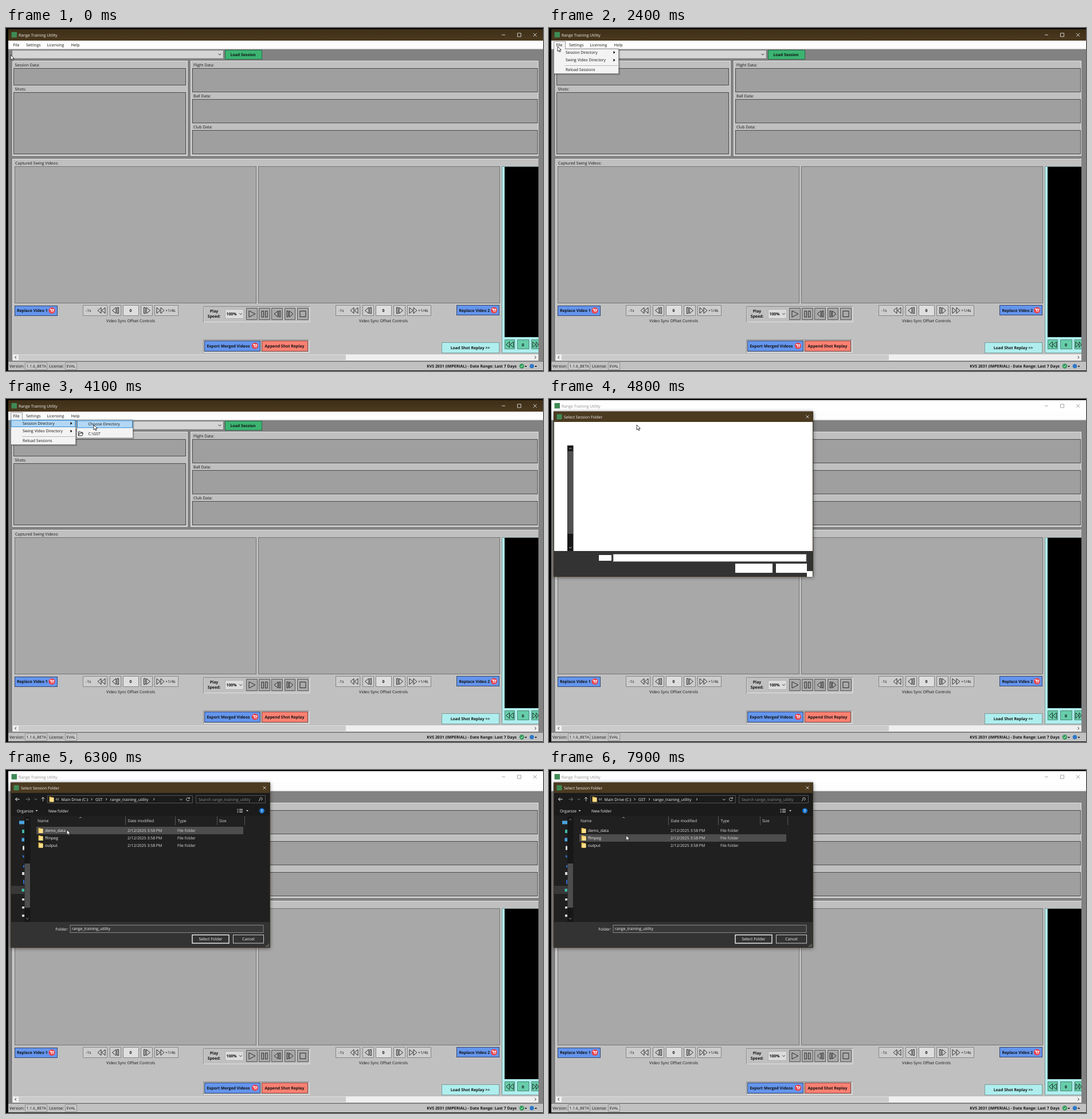
An HTML page for the animation above (8 s loop, 937x598 px).

```html
<!DOCTYPE html>
<html lang="en">
<head>
<meta charset="utf-8">
<title>Range Training Utility</title>
<style>
html, body { margin: 0; width: 100%; height: 100%; overflow: hidden; background: #000; }
svg { display: block; width: 937px; height: 598px; }
text { font: 6.9px "Open Sans", "Noto Sans", sans-serif; fill: #111; text-rendering: geometricPrecision; }
.b text, text.b { font-weight: 700; }
.mid { text-anchor: middle; }
.end { text-anchor: end; }
.light text, text.white { fill: #f4f4f4; }
text.dim { fill: #8c8c8c; }
text.col { fill: #dedede; }
.panel { fill: #c0c0c0; stroke: #e2e2e2; }
.box { fill: #9f9f9f; stroke: #4c4c4c; }
.video { fill: #a8a8a8; stroke: #747474; }
.btn { fill: #cdcdcd; stroke: #858585; }
.key { fill: #a9a9a9; stroke: #555; }
.blue { fill: #6495ed; stroke: #34466b; }
.cyan { fill: #afeeee; stroke: #7d9c9c; }
.teal { fill: #66cdaa; stroke: #4d8875; }
.ico { fill: none; stroke: #1c1c1c; stroke-width: .9; }
.line { fill: none; stroke: #ddd; stroke-width: .9; }
.pick { fill: #b3d7f3; stroke: #0078d7; stroke-width: .8; }
.hover { fill: #4d4d4d; }
.shade { filter: drop-shadow(0 1.5px 3px rgba(0, 0, 0, .5)); }

/* Timed states */
.s { opacity: 0; animation: 8s step-end infinite; }
.menu { animation-name: menu; }
.item { animation-name: item; }
.sub { animation-name: sub; }
.choose { animation-name: choose; }
.idle { animation-name: idle; }
.blank { animation-name: blank; }
.dialog { animation-name: dialog; }
.head { animation-name: head; }
.root { animation-name: root; }
.named { animation-name: named; }
.rowA { animation-name: rowA; }
.inner { animation-name: inner; }
.rowB { animation-name: rowB; }
.rowC { animation-name: rowC; }
@keyframes menu { 25% { opacity: 1 } 55%, 100% { opacity: 0 } }
@keyframes item { 36.25% { opacity: 1 } 55%, 100% { opacity: 0 } }
@keyframes sub { 41.25% { opacity: 1 } 55%, 100% { opacity: 0 } }
@keyframes choose { 47.5% { opacity: 1 } 55%, 100% { opacity: 0 } }
@keyframes idle { 55%, 100% { opacity: 1 } }
@keyframes blank { 57.5% { opacity: 1 } 61.25%, 100% { opacity: 0 } }
@keyframes dialog { 61.25%, 100% { opacity: 1 } }
@keyframes head { 67.5% { opacity: 1 } 70%, 100% { opacity: 0 } }
@keyframes root { 61.25% { opacity: 1 } 77.5%, 100% { opacity: 0 } }
@keyframes rowA { 70% { opacity: 1 } 77.5%, 100% { opacity: 0 } }
@keyframes named { 75%, 100% { opacity: 1 } }
@keyframes inner { 77.5%, 100% { opacity: 1 } }
@keyframes rowB { 77.5% { opacity: 1 } 93.75%, 100% { opacity: 0 } }
@keyframes rowC { 93.75%, 100% { opacity: 1 } }

#cursor { animation: roam 8s ease-in-out infinite; }
@keyframes roam {
  0%, 12.5% { transform: translate(8px, 47px); }
  23.75%, 31.25% { transform: translate(15px, 32px); }
  35% { transform: translate(20px, 35px); }
  38.75%, 43.75% { transform: translate(82px, 43px); }
  51.25%, 61.25% { transform: translate(153px, 45px); }
  68.75% { transform: translate(126px, 91px); }
  72.5%, 77.5% { transform: translate(104px, 104px); }
  88.75%, 91.25% { transform: translate(185.5px, 111px); }
  98.75%, 100% { transform: translate(134.5px, 114px); }
}
</style>
</head>
<body>
<svg viewBox="0 0 937 598">
<defs>
  <linearGradient id="bar" x2="0" y2="1"><stop stop-color="#3f2f18"/><stop offset="1" stop-color="#4b3a20"/></linearGradient>
  <path id="twin" d="M-1-5L-7 0L-1 5ZM6-5L0 0L6 5Z"/>
  <path id="step" d="M1-5.2L-5.5 0L1 5.2ZM3-5.2h2.5v10.4h-2.5Z"/>
  <path id="down" d="M-2.3-1.2L0 1.2L2.3-1.2"/>
  <path id="next" d="M-1-2L1 0L-1 2"/>
  <path id="drop" d="M-2-1h4l-2 2.2Z"/>
  <path id="winctl" d="M865 12h6M892.5 9h6v6h-6ZM920 9l6 6m0-6l-6 6"/>
  <g id="cart"><circle r="5.6" fill="#e8434c"/><path d="M-3.2-2.4h1.4l.9 3.4h3.4l.8-2.6h-4.8M-.6 2.6h.1M2 2.6h.1" fill="none" stroke="#fff" stroke-width="1.1" stroke-linecap="round"/></g>
  <g id="folder"><path d="M0 .5h3l1 1h3.6v8h-7.6Z" fill="#e9b949"/><path d="M1.3 2.5h6.8v7h-6.8Z" fill="#ffe08a"/></g>
  <g id="sync">
    <path class="btn" d="M134.5 483.5h42v18h-42ZM181.5 483.5h19v18h-19ZM235.5 483.5h20v18h-20ZM259.5 483.5h41v18h-41Z"/>
    <path d="M204.5 483.5h27v18h-27Z" fill="#dedede" stroke="#858585"/>
    <g class="ico">
      <use href="#twin" x="167" y="492.500"/><use href="#step" x="191" y="492.500"/>
      <use href="#step" transform="translate(246 492.500) scale(-1 1)"/>
      <use href="#twin" transform="translate(269 492.500) scale(-1 1)"/>
    </g>
    <text x="139" y="495">-1s</text><text x="278" y="495">+1/4s</text>
    <text class="b mid" x="217.500" y="495">0</text>
    <text class="mid" x="217.500" y="512.500">Video Sync Offset Controls</text>
  </g>
  <g id="frame">
    <rect class="shade" x="8.500" y="22" width="452" height="287.500" fill="#333" stroke="#3b3122"/>
    <rect x="9" y="22" width="451" height="18" fill="#4b3a20"/>
    <rect x="13.500" y="26.500" width="9" height="9" fill="#3f8a55"/>
    <text class="white" x="26" y="33.500">Select Session Folder</text>
    <path class="line" d="M448.500 28.500l5 5m0-5l-5 5"/>
  </g>
  <g id="kind"><text class="col" x="212">2/12/2025 3:58 PM</text><text class="col" x="299">File folder</text><use href="#folder" x="56.500" y="-7.500"/></g>
</defs>

<!-- Main window -->
<rect x="4" y="2" width="933" height="595" fill="#828282"/>
<rect x="4" y="2" width="933" height="20" fill="url(#bar)"/>
<text class="white" x="22" y="14.500">Range Training Utility</text>
<use href="#winctl" class="line"/>
<g class="s idle">
  <rect x="4" y="2" width="933" height="20" fill="#fff"/>
  <text class="dim" x="22" y="14.500">Range Training Utility</text>
  <use href="#winctl" fill="none" stroke="#999" stroke-width=".9"/>
</g>
<rect x="9.500" y="7" width="9.500" height="9.500" fill="#3f8a55"/>
<rect x="4" y="22" width="933" height="15" fill="#fdfdfd"/>
<rect x="4" y="35.500" width="933" height="1.500" fill="#e4e4e4"/>
<rect class="s menu" x="8.500" y="23.500" width="20" height="13" fill="#f4f4f4" stroke="#999"/>
<text x="12.500" y="31.500">File</text><text x="35" y="31.500">Settings</text>
<text x="71.500" y="31.500">Licensing</text><text x="113.500" y="31.500">Help</text>

<rect x="11.500" y="39.500" width="367" height="13" fill="#d5d5d5" stroke="#c2c2c2"/>
<use href="#down" class="ico" x="373" y="46"/>
<rect x="382.500" y="38.500" width="64" height="16" fill="#3cb371" stroke="#2a6b47"/>
<text class="b mid" x="413.500" y="48.800">Load Session</text>

<g class="panel">
  <rect x="11.500" y="57.500" width="305" height="165"/>
  <rect x="322.500" y="57.500" width="606" height="165"/>
  <path d="M929 228.500H11.500V579.500H929"/>
</g>
<g class="box">
  <rect x="13.500" y="70.500" width="300" height="29"/><rect x="13.500" y="112.500" width="300" height="107"/>
  <rect x="325.500" y="70.500" width="602" height="41"/><rect x="325.500" y="124.500" width="602" height="41"/>
  <rect x="325.500" y="178.500" width="602" height="41"/>
</g>
<text x="15.500" y="67">Session Data:</text><text x="15.500" y="109">Shots:</text>
<text x="327" y="67">Flight Data:</text><text x="327" y="121">Ball Data:</text><text x="327" y="175">Club Data:</text>
<text x="16" y="238">Captured Swing Videos:</text>
<rect class="video" x="15.500" y="241.500" width="421" height="238"/>
<rect class="video" x="440.500" y="241.500" width="421" height="238"/>

<path class="cyan" d="M929 241.500H865.500V566.500H929"/>
<rect x="870" y="242" width="59" height="297" fill="#000"/>
<path class="teal" d="M870.500 543.500h17v16h-17ZM892.500 543.500h20v16h-20ZM929 543.500h-12v16h12"/>
<g class="ico">
  <use href="#twin" x="879.500" y="552"/>
  <path d="M919 547l5 5l-5 5ZM929 552l-4-5v10l4-5"/>
</g>
<text class="b mid" x="902" y="554.500">0</text>

<use href="#sync"/><use href="#sync" x="441"/>

<g class="b">
  <rect class="blue" x="15.500" y="484.500" width="74" height="17"/>
  <text x="19" y="495">Replace Video 1</text><use href="#cart" x="80" y="492.500"/>
  <rect class="blue" x="786.500" y="483.500" width="74" height="17"/>
  <text x="790.500" y="494.500">Replace Video 2</text><use href="#cart" x="851.500" y="492"/>

  <rect class="panel" x="345" y="485.500" width="185" height="27"/>
  <path d="M344.500 513V485.500H530" fill="none" stroke="#8a8a8a"/>
  <text class="mid" x="363" y="496">Play</text><text class="mid" x="363" y="505">Speed:</text>
  <rect x="382.500" y="490.500" width="32" height="16" fill="#dcdcdc" stroke="#b0b0b0"/>
  <text x="384.500" y="501">100%</text><use href="#down" class="ico" x="409.500" y="498.500"/>
  <path class="key" d="M419.500 488.500h19v20h-19ZM441.500 488.500h19v20h-19ZM463.500 488.500h19v20h-19ZM486.500 488.500h18v20h-18ZM508.500 488.500h19v20h-19Z"/>
  <g class="ico">
    <path d="M424 493L435 498.500L424 504ZM446 493.500h3.500v10.500h-3.500ZM452.500 493.500h3.500v10.500h-3.500ZM513 493.500h10v10h-10Z"/>
    <use href="#step" x="473.500" y="498.500"/>
    <use href="#step" transform="translate(495.500 498.500) scale(-1 1)"/>
  </g>

  <rect class="panel" x="345" y="543.500" width="184" height="22"/>
  <path d="M344.500 566V543.500H529" fill="none" stroke="#8a8a8a"/>
  <rect class="blue" x="346.500" y="545.500" width="97" height="18"/>
  <text x="350.500" y="557">Export Merged Videos</text><use href="#cart" x="434.500" y="554"/>
  <rect x="446.500" y="545.500" width="80" height="18" fill="#fa8072" stroke="#7d4740"/>
  <text class="mid" x="486" y="557">Append Shot Replay</text>
  <rect class="cyan" x="760.500" y="548.500" width="100" height="18"/>
  <text class="mid" x="810" y="560">Load Shot Replay &gt;&gt;</text>
</g>

<rect x="12" y="569" width="917" height="10.500" fill="#efefef"/>
<rect x="22" y="569.500" width="571" height="9.500" fill="#cbcbcb"/>
<path class="ico" d="M18 572l-2.500 2.200l2.500 2.200M922.500 572l2.500 2.200l-2.500 2.200"/>

<rect x="4" y="582" width="933" height="15" fill="#c1c1c1"/>
<path d="M33.500 583.500h38v12h-38ZM103.500 583.500h20v12h-20Z" fill="#cbcbcb" stroke="#8e8e8e"/>
<text x="6" y="592">Version:</text><text x="35.500" y="592">1.1.6_BETA</text>
<text x="75" y="592">License:</text><text x="105.500" y="592">EVAL</text>
<text class="b end" x="891" y="592">KVS 2031 (IMPERIAL) - Date Range: Last 7 Days</text>
<circle cx="900" cy="589.500" r="4.200" fill="#2e9b57"/>
<path d="M898 589.500l1.500 1.600l2.800-3" fill="none" stroke="#fff"/>
<circle cx="917.500" cy="589.500" r="3.800" fill="#2f78c8"/>
<use href="#drop" x="907" y="590"/><use href="#drop" x="924.500" y="590"/>

<!-- File menu -->
<g class="s menu">
  <rect x="9" y="37" width="115" height="45" fill="#000" opacity=".2"/>
  <rect x="8.500" y="36.500" width="113" height="43" fill="#f3f3f3" stroke="#888"/>
  <path d="M9 36.500h19" stroke="#f4f4f4"/>
  <rect class="s item pick" x="9" y="37" width="112" height="11.500"/>
  <path d="M28 65.500h92" stroke="#b5b5b5"/>
  <text x="29" y="44.800">Session Directory</text><text x="29" y="58.300">Swing Video Directory</text><text x="29" y="75">Reload Sessions</text>
  <path d="M112.500 40l3 2.500l-3 2.500ZM112.500 53.500l3 2.500l-3 2.500Z"/>
</g>
<g class="s sub">
  <rect x="124" y="38" width="99.500" height="32" fill="#000" opacity=".2"/>
  <rect x="123.500" y="36.500" width="98" height="31.500" fill="#f3f3f3" stroke="#888"/>
  <rect class="s choose pick" x="124.500" y="38" width="96" height="12"/>
  <text x="143.500" y="46.300">Choose Directory</text><text x="143.500" y="63">C:\GST</text>
  <path class="ico" d="M126.500 64v-7h3l1 1h3v1.500M126.500 64l1.700-4.500h6.300L133 64Z"/>
</g>

<!-- Folder picker while loading -->
<g class="s blank">
  <use href="#frame"/>
  <rect x="9" y="40" width="451" height="225" fill="#fff"/>
  <rect x="32" y="81" width="10.500" height="184" fill="#171717"/>
  <rect x="32.500" y="91" width="9.500" height="144" fill="#505050"/>
  <path class="line" d="M35 87.500l2.200-2.200l2.200 2.200M35 258l2.200 2.200l2.200-2.200"/>
  <path d="M87 272h22v10H87ZM325 287h65v16h-65ZM396 287h54v16h-54ZM450 300h10v10h-10Z" fill="#fff"/>
  <rect x="112" y="270.500" width="337" height="13" fill="#fff" stroke="#777"/>
</g>

<!-- Folder picker -->
<g class="s dialog light">
  <use href="#frame"/>
  <rect x="9" y="40" width="451" height="225" fill="#202020"/>
  <rect x="9" y="40" width="451" height="40" fill="#1b1b1b"/>
  <path class="line" d="M23.500 51h-7l3-3m-3 3l3 3" opacity=".55"/>
  <path class="s inner line" d="M23.500 51h-7l3-3m-3 3l3 3"/>
  <path class="line" d="M34.500 51h7l-3-3m3 3l-3 3" opacity=".55"/>
  <use href="#down" class="line" x="52" y="51" opacity=".6"/>
  <path class="line" d="M64.500 54.500v-7l-3 3m3-3l3 3"/>
  <path d="M72.500 44.500h253v13h-253ZM331.500 44.500h121v13h-121Z" fill="#1b1b1b" stroke="#555"/>
  <use href="#folder" x="75.500" y="46"/>
  <use href="#down" class="line" x="305.500" y="51.500"/>
  <path class="line" d="M319.800 49.500a2.800 2.800 0 1 0 .3 2.500M320.300 47.500v2.300h-2.300"/>
  <path class="line" d="M443.500 52a2.200 2.200 0 1 1 1.500.6M443.500 51.500l-2.700 2.700"/>
  <text x="19" y="73.500">Organize</text><use href="#drop" x="53.500" y="71" fill="#ddd"/>
  <text x="74" y="73.500">New folder</text>
  <path d="M403.500 68.500h2M403.500 71h2M403.500 73.500h2M407 68.500h6M407 71h6M407 73.500h6" stroke="#ddd"/>
  <use href="#drop" x="421" y="71" fill="#ddd"/>
  <circle cx="446.500" cy="71" r="4.500" fill="#1976d2"/><text class="b mid" x="446.500" y="73.500">?</text>

  <rect class="s head" x="45" y="81" width="164" height="15" fill="#434343"/>
  <use href="#down" class="s head line" x="203" y="88.500"/>
  <path d="M208.500 81v15M295.500 81v15M368.500 81v15M416.500 81v15" stroke="#595959"/>
  <path class="line" d="M128 84l2-2l2 2" opacity=".7"/>
  <text class="col" x="55" y="90.800">Name</text><text class="col" x="212.500" y="90.800">Date modified</text>
  <text class="col" x="299.500" y="90.800">Type</text><text class="col" x="372" y="90.800">Size</text>

  <!-- Side tree -->
  <rect x="9" y="202" width="23" height="14" fill="#383838"/>
  <path d="M23 88.500h9v6h-9ZM27.500 118.500h4.500v6h-4.500Z" fill="#4aa3df"/>
  <path d="M28 104h4v6h-4ZM27.500 207h4.500v5h-4.500Z" fill="#3fb8a8"/>
  <path d="M29 132.500h3v7h-3ZM28 178h4v5h-4ZM28 224h4v3.500h-4ZM28 238h4v3.500h-4ZM28 252h4v4h-4Z" fill="#d9d9d9"/>
  <path d="M28 149h4l-1 5ZM30 166h2v4h-2ZM30 191.500h2v7h-2Z" fill="#2f6fd0"/>
  <rect x="32" y="81" width="10.500" height="184" fill="#171717"/>
  <rect x="32.500" y="163" width="9.500" height="77" fill="#4d4d4d"/>
  <path class="line" d="M35 87.500l2.200-2.200l2.200 2.200M35 258l2.200 2.200l2.200-2.200" opacity=".7"/>

  <!-- Top folder -->
  <g class="s root">
    <g class="line">
      <use href="#next" x="89.500" y="51"/><use href="#next" x="127" y="51"/>
      <use href="#next" x="186" y="51"/><use href="#next" x="212" y="51"/>
    </g>
    <text x="96.500" y="53.500">This PC</text><text x="134" y="53.500">Main Drive (C:)</text><text x="193" y="53.500">GST</text>
    <text class="dim" x="336" y="53.500">Search GST</text>
    <rect class="s rowA hover" x="53" y="99" width="361" height="13"/>
    <use href="#kind" y="108"/><text x="68" y="108">range_training_utility</text>
  </g>

  <!-- Opened folder -->
  <g class="s inner">
    <g class="line">
      <path d="M89 49l-1.800 2l1.800 2M92 49l-1.800 2l1.800 2"/>
      <use href="#next" x="149.500" y="51"/><use href="#next" x="175" y="51"/><use href="#next" x="258" y="51"/>
    </g>
    <text x="96.500" y="53.500">Main Drive (C:)</text><text x="156" y="53.500">GST</text><text x="181.500" y="53.500">range_training_utility</text>
    <text class="dim" x="336" y="53.500">Search range_training_utility</text>
    <rect class="s rowB hover" x="53" y="99" width="361" height="13"/>
    <rect class="s rowC hover" x="53" y="112" width="361" height="13"/>
    <use href="#kind" y="108"/><text x="68" y="108">demo_data</text>
    <use href="#kind" y="121"/><text x="68" y="121">ffmpeg</text>
    <use href="#kind" y="133.500"/><text x="68" y="133.500">output</text>
  </g>

  <text class="end" x="108.500" y="279.500">Folder:</text>
  <rect x="112" y="270.500" width="337" height="13" fill="#383838" stroke="#888"/>
  <path class="s root" d="M115.500 272.500v9" stroke="#ddd" stroke-width=".8"/>
  <text class="s named" x="115" y="279.300">range_training_utility</text>
  <rect x="325" y="287.500" width="64" height="14.500" fill="#333" stroke="#fff" stroke-width="1.300"/>
  <rect x="396.500" y="287.500" width="53" height="14.500" fill="#333" stroke="#c8c8c8"/>
  <text class="mid" x="357" y="297.300">Select Folder</text><text class="mid" x="423" y="297.300">Cancel</text>
  <path d="M453 307.500h1.500m1 0h1.500m1 0h1M455.500 305.500h1.500m1 0h1M458 303.500h1" stroke="#aaa"/>
</g>

<path id="cursor" d="M0 0V8.800L2.100 6.900L3.500 10L5 9.300L3.600 6.300H6.400Z" fill="#fff" stroke="#111" stroke-width=".8"/>
</svg>
</body>
</html>
```
